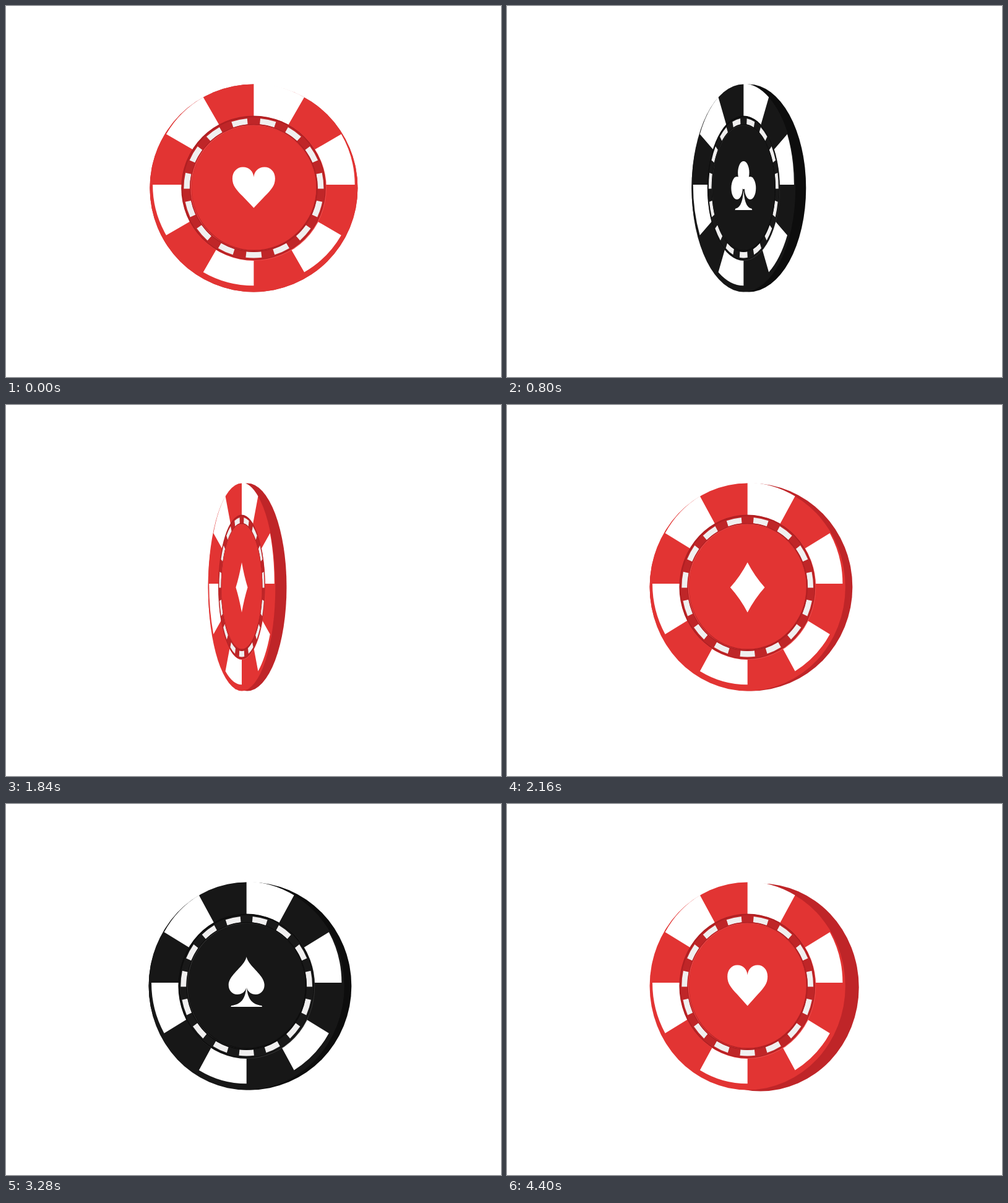
An HTML page that plays this animation: 800 by 600 pixels, repeating every 4480 ms.

```html
<!DOCTYPE html>
<html lang="en">
<head>
<meta charset="utf-8">
<title>Spinning poker chip</title>
<style>
  html, body { margin: 0; width: 100%; height: 100%; overflow: hidden; background: #fff; }
  svg { display: block; width: 100vw; height: 100vh; }
</style>
</head>
<body>
<svg id="stage" viewBox="0 0 800 600"></svg>
<script>
const STEP = 80, HALF = 7, TURN = 2 * HALF;
const RADIUS = 168, CENTER_Y = 294.4, THICKNESS = 18.6;

const RED = { face: '#e23433', rim: '#bf2528', ring: '#bf2628', edge: '#b01f22', light: '#ee4a49' };
const BLACK = { face: '#171717', rim: '#0d0d0d', ring: '#191919', edge: '#0d0d0d', light: '#303030' };

const SUITS = {
  heart: `<path d="M0 32L-18 13C-28 3-34.5-4-34.5-15.5C-34.5-26.5-27-34-17.5-34C-7-34-1-27 0-18
    C1-27 7-34 17.5-34C27-34 34.5-26.5 34.5-15.5C34.5-4 28 3 18 13Z"/>`,
  club: `<circle cy="-25" r="18.4"/><circle cx="-21.5" r="18.4"/><circle cx="21.5" r="18.4"/>
    <circle cy="-6" r="8"/><path d="M0 3C-3 24-12 32-26 33L-28 35.6H28L26 33C12 32 3 24 0 3Z"/>`,
  diamond: '<path d="M0-40Q-12-18-29.6 .5Q-12 19 0 41Q12 19 29.6 .5Q12-18 0-40Z"/>',
  spade: `<path d="M0-47.5C-3-32-30.8-18-30.8-2C-30.8 7.5-24 13.5-16 13.5C-8 13.5-2 9-.5 2.5
    C-2 21-10 30-26 31.5L-27 33.5H27L26 31.5C10 30 2 21 .5 2.5C2 9 8 13.5 16 13.5
    C24 13.5 30.8 7.5 30.8-2C30.8-18 3-32 0-47.5Z"/>`
};

// depthPower sets how early the rim comes into view
const CHIPS = [
  { suit: 'heart', colors: RED, depthPower: 0.22, slide: true, edgeHeight: 338.5 },
  { suit: 'club', colors: BLACK, depthPower: 0.31, edgeHeight: 338.5 },
  { suit: 'diamond', colors: RED, depthPower: 0.22, edgeHeight: 336 },
  { suit: 'spade', colors: BLACK, depthPower: 0.22, edgeHeight: 338.5 }
];

const circle = (x, y, r, fill) => `<circle cx="${x}" cy="${y}" r="${r}" fill="${fill}"/>`;

function polar(r, degrees) {
  const a = degrees * Math.PI / 180;
  return `${(r * Math.sin(a)).toFixed(2)} ${(-r * Math.cos(a)).toFixed(2)}`;
}

function sector(inner, outer, from, to) {
  return `M${polar(inner, from)}L${polar(outer, from)}A${outer} ${outer} 0 0 1 ${polar(outer, to)}` +
    `L${polar(inner, to)}A${inner} ${inner} 0 0 0 ${polar(inner, from)}Z`;
}

const repeat = (count, make) => Array.from({ length: count }, (_, i) => make(i)).join('');
const WEDGES = repeat(6, i => sector(100, 163.3, i * 60, i * 60 + 30));
const DASHES = repeat(15, i => sector(103.5, 113, i * 24 + 5.4, i * 24 + 18.6));

function faceMarkup({ suit, colors: c }) {
  return circle(0, 0, RADIUS, c.face) +
    `<path d="${WEDGES}" transform="translate(0 -5.4)" fill="#fff"/>` +
    circle(0.5, 0.5, 117, c.light) +
    circle(-0.4, -0.2, 116.8, c.edge) +
    circle(0.2, 0.3, 115, c.ring) +
    `<path d="${DASHES}" fill="#f0efef"/>` +
    circle(0, 0, 103.3, c.edge) +
    circle(-0.3, -0.2, 101.8, c.light) +
    circle(0.5, 0.3, 101.3, c.edge) +
    circle(0.3, -0.5, 100.7, c.face) +
    `<g fill="#fff">${SUITS[suit]}</g>`;
}

const stage = document.getElementById('stage');
stage.innerHTML = CHIPS.map(chip =>
  `<g><ellipse fill="${chip.colors.rim}"/>` +
  `<rect fill="${chip.colors.rim}" rx="9.3" ry="50"/>` +
  `<g>${faceMarkup(chip)}</g></g>`).join('');
const groups = [...stage.children];

function setAttrs(node, attrs) {
  for (const name in attrs) node.setAttribute(name, attrs[name]);
}

// Cubic Bezier easing, solved for x by bisection
function ease(x) {
  const curve = (s, a, b) => 3 * (1 - s) * (1 - s) * s * a + 3 * (1 - s) * s * s * b + s ** 3;
  let low = 0, high = 1;
  for (let i = 0; i < 30; i++) {
    const mid = (low + high) / 2;
    if (curve(mid, 0.26, 0.83) < x) low = mid; else high = mid;
  }
  return curve(low, 0, 0.88);
}

function drawChip(chip, group, phase) {
  const [rim, side, face] = group.children;
  const edgeOn = Math.abs(phase) === HALF;
  const scale = edgeOn ? 0 : 1 - ease(Math.abs(phase) / HALF);
  const depth = THICKNESS * (1 - scale * scale) ** chip.depthPower;
  const right = 399 + 1.4 * scale * scale;
  const left = right - depth;
  const half = RADIUS * scale;
  const sliding = chip.slide && phase < 0;
  const rimLeft = left - half + (sliding ? 23 * scale * scale : 0);
  const rimRight = right + half + (sliding ? 11 * scale : 0);

  rim.style.display = face.style.display = edgeOn ? 'none' : '';
  side.style.display = edgeOn ? '' : 'none';
  setAttrs(side, { x: left, y: 126.4, width: depth, height: chip.edgeHeight });
  setAttrs(rim, {
    cx: (rimLeft + rimRight) / 2,
    cy: CENTER_Y + (sliding ? 2 : 0),
    rx: (rimRight - rimLeft) / 2,
    ry: RADIUS
  });
  setAttrs(face, { transform: `translate(${phase < 0 ? left : right} ${CENTER_Y}) scale(${scale} 1)` });
}

function render(ms) {
  const tick = Math.floor(ms / STEP) + HALF;
  const active = Math.floor(tick / TURN) % CHIPS.length;
  groups.forEach((group, i) => { group.style.display = i === active ? '' : 'none'; });
  drawChip(CHIPS[active], groups[active], tick % TURN - HALF);
}

const start = performance.now();
function loop() {
  render(performance.now() - start);
  requestAnimationFrame(loop);
}
loop();
</script>
</body>
</html>
```
